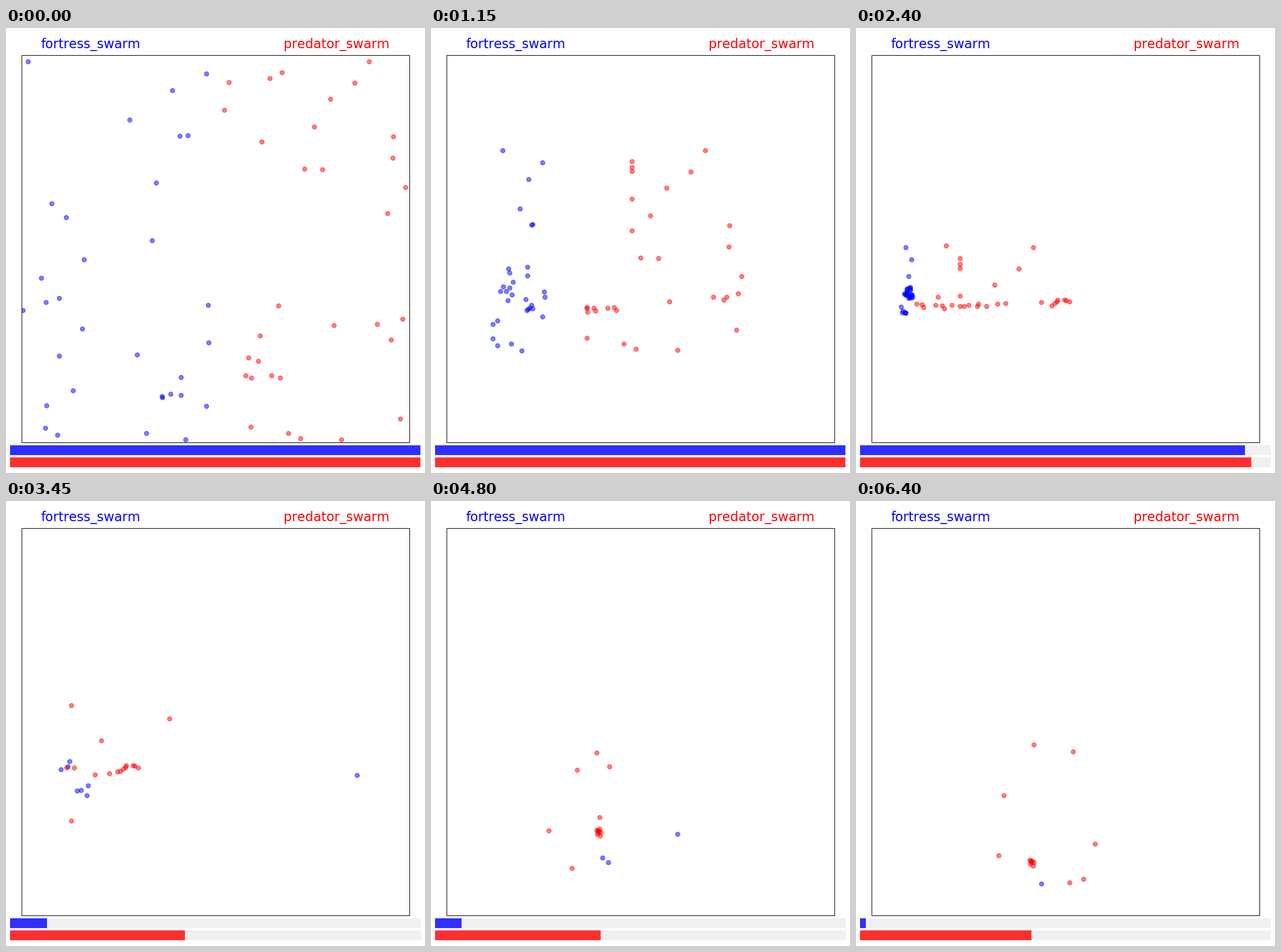
Animation, 726 px wide and 771 px high, one loop 6450 ms. Source, as a matplotlib script:

```python
import numpy as np
import matplotlib.pyplot as plt
from matplotlib.animation import FuncAnimation
from matplotlib.patches import Rectangle

W, H, DPI = 726, 771, 90
FRAMES, STEP_MS = 129, 50
LEFT, SIDE = 27.5, 671.5
SPEED = SIDE / 100            # top speed per axis and step
KEYS = [0, 14, 33, 48, 69, 96, 128]
BAR_LEFT, BAR_FULL = 7, 711.5

rng = np.random.default_rng(4)
steps = np.arange(FRAMES)
ms = steps * STEP_MS


def glide(k, xs, ys, keys=KEYS[:5]):
    return np.array([np.interp(k, keys, xs), np.interp(k, keys, ys)])


def chase(start, goal, loners):
    """Step every dot towards its goal; loners leave for waypoints of their own."""
    pos, track = start, [start]
    for k in steps[1:]:
        aim = goal(k, pos)
        for dot, (since, *path) in enumerate(loners):
            if k >= since:
                aim[dot] = glide(k, path[::2], path[1::2], KEYS[-len(path) // 2:])
        pos = pos + np.clip(aim - pos, -SPEED, SPEED)
        track.append(pos)
    return np.array(track)


def bury(track, death):
    track[steps[:, None] >= death] = np.nan
    return track


def fortress():
    start = np.reshape([
        69.5, 653.5, 88.5, 704.5, 311, 713, 67.5, 692.5, 242.5, 701.5, 37.5, 57.5,
        347, 79, 288, 108, 213.5, 159, 300.5, 187, 315, 186, 260, 268, 78.5, 304,
        104, 328, 252.5, 368, 134.5, 401, 60.5, 433, 68.5, 475, 92, 467.5, 29, 489,
        350, 480, 132, 521, 351, 545, 92, 568, 227, 565.5, 302.5, 604.5, 116, 628,
        270, 638, 270.5, 640, 284.5, 633.5, 302.5, 635.5, 347, 654.5], (-1, 2))
    x0, y0 = start.T
    flank = (y0 > 690) | ((y0 > 600) & (x0 < 125))
    spread = start - start.mean(axis=0)
    jitter = rng.normal(size=start.shape)

    def goal(k, pos):
        centre = glide(k, [180, 180, 127, 91, 106], [460, 470, 432, 460, 450])
        detour = glide(k, [0, 0, -45, -5, 30], [0, 0, 52, 25, 48])
        return (centre + flank[:, None] * detour + spread * np.exp(-k / 14)
                + jitter * np.interp(k, [48, 69], [2, 8]))

    # the first one leaves through the left wall and comes back on the right
    loners = [(44, 77.5, 483, -64, 475, -244.5, 576.5, -351, 662.5),
              (60, 142, 493, 297, 618, 312, 640),
              (60, 139.5, 510, 307, 625.5, 318, 645)]
    track = chase(start, goal, loners)
    track[..., 0] = LEFT + (track[..., 0] - LEFT) % SIDE
    return bury(track, np.hstack([np.inf, 107, 110, np.linspace(71, 77, 5),
                                  np.linspace(50, 68, 24)]))


def predator():
    start = np.reshape([
        424, 691, 425, 606, 419.5, 571, 478, 77, 604, 95, 629, 58, 643, 513, 562, 123,
        581, 712.5, 661, 320.5, 666.5, 539.5, 670, 225, 671, 188, 683, 677, 686.5, 504,
        692, 276, 457, 86.5, 386, 94, 534, 171, 378, 142, 443, 197, 517, 243.5,
        548, 245, 471.5, 481, 567.5, 515, 439.5, 533, 436.5, 577, 415, 602,
        460, 602, 475, 606, 488.5, 701.5, 509.5, 710.5], (-1, 2))
    x0, y0 = start.T
    lead = np.where(y0 < 400, 502, 424.5)
    jitter = rng.normal(size=start.shape) * 2.5

    def goal(k, pos):
        if k >= 72:
            return glide(k, [150, 291, 305], [470, 574, 626], [72, 96, 128]) + jitter
        front = 424 - SPEED * k
        slope = 0.16 * min(1, np.exp((14 - k) / 20))
        y = np.interp(k, KEYS[:5], [540, 513, 463, 482, 464])
        return np.column_stack([np.maximum(lead - SPEED * k, 105),
                                y - slope * (pos[:, 0] - front) + jitter[:, 1]])

    loners = [(33, 155.5, 377, 113, 354, 252.5, 465.5, 256, 509.5),
              (33, 210, 481.5, 282.5, 377, 309, 459.5, 376, 433.5),
              (33, 142, 466, 113, 553.5, 204, 571, 246.5, 613.5),
              (33, 179.5, 400.5, 164.5, 415, 287, 436, 308, 422),
              (69, 243.5, 636, 369.5, 661),
              (69, 291.5, 548, 414, 594),
              (69, 292, 568, 394, 654.5)]
    track = chase(start, goal, loners)

    # early arrivals fall in the fight, the rest win it
    death = (np.maximum(x0, lead) - 110) / SPEED + 1.3
    death[death > 72] = np.inf
    death[:4] = np.inf
    return bury(track, death)


def fade(centre, scale):
    return 1 / (1 + np.exp((ms - centre) / scale))


def health(floor, heal, centre, scale):
    rest = floor + heal * (ms - 4800)
    return rest + (1 - rest) * fade(centre, scale)


tracks = [fortress(), predator()]
levels = [health(0.0646, 1.3e-5, 2891, 184) - 0.071 * (1 - fade(5380, 35)),
          health(0.403, 8.75e-6, 2895, 198)]

plt.rcParams["text.kerning_factor"] = 6
fig = plt.figure(figsize=(W / DPI, H / DPI), dpi=DPI, facecolor="white")
ax = fig.add_axes([0, 0, 1, 1])
ax.set(xlim=(0, W), ylim=(H, 0))
ax.axis("off")

arena = Rectangle((27, 47), 672, 671, fill=False, ec="black", lw=0.8, zorder=4)
ax.add_patch(arena)

dots, fills = [], []
teams = [("fortress_swarm", "blue", "#2f2fff", 147, 723),
         ("predator_swarm", "red", "#ff2f2f", 572.7, 744)]
for name, color, tint, text_x, bar_y in teams:
    ax.text(text_x, 35, name, color=color, fontsize=18, family="DejaVu Sans",
            ha="center", va="baseline")
    for shade in ("#f0f0f0", tint):
        bar = Rectangle((BAR_LEFT, bar_y), BAR_FULL, 17, fc=shade, lw=0)
        ax.add_patch(bar)
    fills.append(bar)
    line, = ax.plot([], [], "o", color=color, ms=6, mew=1, alpha=0.5)
    line.set_clip_path(arena)
    dots.append(line)


def draw(i):
    for line, fill, track, level in zip(dots, fills, tracks, levels):
        line.set_data(*track[i].T)
        fill.set_width(BAR_FULL * level[i])
    return dots + fills


anim = FuncAnimation(fig, draw, frames=FRAMES, interval=STEP_MS, repeat=True,
                     repeat_delay=0, blit=False)
plt.show()
```
